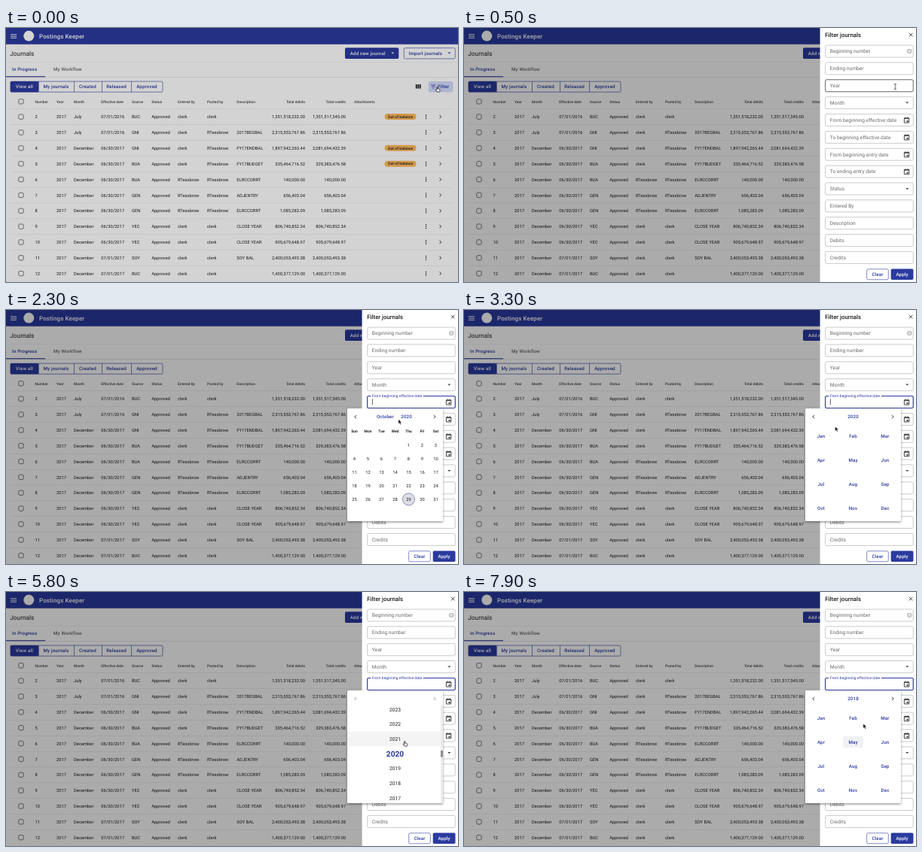
Write an HTML page that moves like this. It is 600x338 px and loops after 8000 ms.

```html
<!DOCTYPE html>
<html lang="en">
<head>
<meta charset="utf-8">
<title>Filter journals</title>
<style>
html, body { margin: 0; width: 100%; height: 100%; overflow: hidden; background: #fff; }
svg { display: block; width: 100vw; height: 100vh; }
text { font: 5.8px Roboto, sans-serif; fill: #1c1c1c; text-rendering: geometricPrecision; white-space: pre; }
.title { font-size: 8px; font-weight: 500; fill: #fff; letter-spacing: .1px; }
.heading { font-size: 8.3px; }
.label { font-size: 6.2px; font-weight: 500; letter-spacing: .15px; }
.blue { fill: #2a3a9f; }
.white { fill: #fff; }
.grey { fill: #666; }
.column { font-size: 4.8px; font-weight: 500; fill: #444; }
.badge { font-size: 5.1px; font-weight: 500; }
.panel-title { font-size: 7.8px; font-weight: 500; }
.field { font-size: 6.7px; fill: #6b6b6b; }
.float { font-size: 5px; fill: #2a3a9f; }
.weekday { font-size: 4.9px; font-weight: 700; }
.year { font-size: 6.7px; }
.chosen { font-size: 10.2px; font-weight: 700; fill: #2a3a9f; }
.mid { text-anchor: middle; }
.end { text-anchor: end; }
.line { fill: none; stroke: #333; stroke-width: .9; }
.popup { transform-origin: 516px 131px; }
</style>
</head>
<body>
<svg id="stage" viewBox="0 0 600 338"></svg>
<script>
const LOOP = 8000;
const BLUE = '#2a3a9f';
const USER = 'clerk', STAFF = 'RTessbrow';

const text = (x, y, str, cls = '') => `<text x="${x}" y="${y}" class="${cls}">${str}</text>`;
const rect = (x, y, w, h, fill, extra = '') =>
  `<rect x="${x}" y="${y}" width="${w}" height="${h}" fill="${fill}" ${extra}/>`;
const path = (d, extra = 'class="line"') => `<path d="${d}" ${extra}/>`;
const group = (id, body, extra = '') => `<g id="${id}" ${extra}>${body}</g>`;
const range = (n, fn) => Array.from({ length: n }, (_, i) => fn(i)).join('');
const outline = (x, y, w, h, color, width = .6) =>
  rect(x, y, w, h, 'none', `rx="1.8" stroke="${color}" stroke-width="${width}"`);
const triangle = (x, y, fill) => path(`M${x - 2} ${y - 1}h4l-2 2z`, `fill="${fill}"`);
const chevron = (x, y, dir, color = '#222') =>
  path(`M${x - dir} ${y - 2.2}l${2.2 * dir} 2.2l${-2.2 * dir} 2.2`, `fill="none" stroke="${color}" stroke-width=".9"`);

// Page behind the drawer
function pageHead() {
  const tabs = [['View all', 6, 37], ['My journals', 43, 47], ['Created', 90, 37], ['Released', 127, 39], ['Approved', 166, 42]];
  return rect(0, 0, 600, 338, '#fff') + rect(0, 0, 600, 21.7, BLUE) +
    path('M6 8.7h8M6 11h8M6 13.3h8', 'stroke="#fff" stroke-width=".9"') +
    '<circle cx="30.3" cy="10.6" r="7" fill="#fff"/>' +
    text(44, 13.5, 'Postings Keeper', 'title') +
    text(5.3, 36.6, 'Journals', 'heading') +
    rect(450, 26.3, 71.3, 14.8, BLUE, 'rx="1.8"') + text(456.8, 35.9, 'Add new journal', 'label white') +
    triangle(513.3, 33.5, '#fff') +
    outline(528.3, 26.6, 68, 14.3, BLUE) + text(534.5, 35.9, 'Import journals', 'label blue') + triangle(588.5, 33.5, BLUE) +
    rect(0, 45.4, 600, .4, '#e4e4e4') +
    text(8, 57.2, 'In Progress', 'label blue') + text(63, 57.2, 'My Workflow', 'label grey') +
    rect(0, 65, 600, .5, '#d5d5d5') + rect(0, 64.2, 52, 1.1, BLUE) +
    rect(6, 71, 37, 14.3, BLUE, 'rx="1.5"') + outline(5.8, 71.1, 202.2, 14.1, BLUE) +
    tabs.map(([name, x, w], i) => rect(x, 71.1, .6, 14, BLUE) +
      text(x + w / 2, 80.4, name, 'label mid ' + (i ? 'blue' : 'white'))).join('') +
    range(3, i => rect(543.8 + i * 2.5, 75, 2, 5.6, '#333')) +
    rect(560.7, 71, 32.6, 14.4, '#d3d9fb', 'rx="1.8"') +
    path('M564 76h6.4M565.2 78.1h4M566.4 80.2h1.6', `stroke="${BLUE}" stroke-width=".8"`) +
    text(573.2, 80.4, 'Filter', 'label blue');
}

function table() {
  const stops = [38.5, 67, 90, 126.3, 167, 193.3, 228, 267, 306.3, 397, 451, 462];
  const align = i => i === 9 || i === 10 ? ' end' : '';
  const names = 'Number|Year|Month|Effective date|Source|Status|Entered by|Posted by|Description|Total debits|Total credits|Attachments';
  const rows = [
    ['BUC', USER, USER, '', '1,351,518,232.00', '1,351,517,345.00', 'out'],
    ['GNI', USER, STAFF, '2017BEGBAL', '2,315,553,767.86'],
    ['GNI', USER, STAFF, 'FY17ENDBAL', '1,897,942,265.44', '2,081,694,432.39', 'out'],
    ['BUA', USER, STAFF, 'FY17BUDGET', '335,464,716.52', '329,383,476.58', 'out'],
    ['BUA', STAFF, STAFF, 'ELRCCORRT', '140,000.00'],
    ['GEN', STAFF, STAFF, 'ADJENTRY', '656,403.04'],
    ['GEN', STAFF, STAFF, 'ELRCCORRT', '1,085,283.09'],
    ['YEC', USER, USER, 'CLOSE YEAR', '806,740,852.34'],
    ['YEC', USER, USER, 'CLOSE YEAR', '905,679,648.97'],
    ['SOY', USER, USER, 'SOY BAL', '2,400,053,493.38'],
    ['BUC', USER, USER, '', '1,400,377,129.00']
  ];
  const checkbox = y => outline(16.8, y - 3.2, 6.4, 6.4, '#555', .8);
  return checkbox(97.8) + names.split('|').map((n, i) => text(stops[i], 99.5, n, 'column' + align(i))).join('') +
    rows.map(([source, entered, posted, note, debit, credit = debit, out], i) => {
      const y = 118.1 + i * 20.86;
      const month = i < 2 ? 'July' : 'December';
      const date = i < 2 ? '07/01/2016' : i < 9 ? '06/30/2017' : '07/01/2017';
      const cells = [i + 2, 2017, month, date, source, 'Approved', entered, posted, note, debit, credit];
      return rect(5, y - 10.5, 589, .45, '#dcdcdc') + checkbox(y) +
        cells.map((c, k) => text(stops[k], y + 2.1, c, align(k))).join('') +
        (out ? rect(502.6, y - 4, 42, 8, '#ffb85c', 'rx="4"') + text(523.6, y + 1.8, 'Out of balance', 'badge mid') : '') +
        range(3, k => `<circle cx="557.5" cy="${y - 2.3 + k * 2.3}" r=".75" fill="#222"/>`) + chevron(576.5, y, 1);
    }).join('');
}

// Filter drawer
const fieldTop = i => 23 + i * 22.87;
const box = (i, color, width) => outline(479.6, fieldTop(i), 116.7, 16, color, width);

function calendarIcon(y) {
  return path(`M584.4 ${y - 2.6}h6.4v6.2h-6.4zM584.4 ${y - 1.9}h6.4M586 ${y - 4}v1.5M589.2 ${y - 4}v1.5`) +
    rect(587.6, y + .6, 2, 2, '#333');
}

function drawer() {
  const fields = ['Beginning number', 'Ending number', 'Year', 'Month', 'From beginning effective date', 'To beginning effective date',
    'From beginning entry date', 'To ending entry date', 'Status', 'Entered By', 'Description', 'Debits', 'Credits'];
  const body = fields.map((name, i) => {
    const y = fieldTop(i) + 8;
    const label = text(485.8, y + 2.3, name, 'field');
    return (i === 4 ? group('restLabel', label) : label) + box(i, '#a8a8a8') +
      (i === 3 || i === 8 ? triangle(588.3, y, '#333') : '') + (i > 3 && i < 8 ? calendarIcon(y) : '');
  }).join('');
  const top = fieldTop(4);
  const focus = box(4, BLUE, 1.1) + rect(484.3, top - 1, 69.5, 2, '#fff') +
    text(486, top + 1.2, 'From beginning effective date', 'float') +
    group('caret', rect(485.9, top + 3.8, .7, 8, '#222'));
  return rect(472.6, 0, 128, 338, '#fff') + text(479.3, 11.8, 'Filter journals', 'panel-title') +
    path('M590.9 6.7l4.6 4.6M595.5 6.7l-4.6 4.6') + body +
    outline(588.5, 28.6, 5.6, 4.6, '#777', .7) + path('M589.8 30.2h1.2M589.8 31.6h1.2M592 30.2h1M592 31.6h1', 'stroke="#777" stroke-width=".6"') +
    group('hoverYear', box(2, '#333')) + group('hoverMonth', box(3, '#333')) + group('hoverDate', box(4, '#333')) +
    group('focus', focus) +
    outline(534.7, 320.8, 28.6, 14, BLUE) + text(549, 330, 'Clear', 'label blue mid') +
    rect(566.7, 320.5, 29.8, 14.6, BLUE, 'rx="1.8"') + text(581.6, 330, 'Apply', 'label white mid');
}

// Date picker views
const arrows = color => chevron(464, 142, -1, color) + chevron(569, 142, 1, color);

function daysView(id, month, first, count, active) {
  const at = d => [462.5 + (d + first - 1) % 7 * 18, 179.5 + Math.floor((d + first - 1) / 7) * 18.1];
  const [cx, cy] = at(active);
  const body = ['Sun', 'Mon', 'Tue', 'Wed', 'Thu', 'Fri', 'Sat'].map((d, i) => text(462.5 + i * 18, 163, d, 'weekday mid')).join('') +
    `<circle cx="${cx}" cy="${cy}" r="8.1" fill="#dcdde6" stroke="${active === 29 ? '#4a558f' : 'none'}" stroke-width=".6"/>` +
    range(count, i => { const [x, y] = at(i + 1); return text(x, y + 2.1, i + 1, 'mid'); });
  return group(id, arrows('#222') + text(503.4, 144.1, month, 'label blue mid') + text(531.6, 144.1, '2020', 'label blue mid') +
    group(id + 'Body', body));
}

const monthX = i => 474 + i % 3 * 42.5;
const monthY = i => 167.8 + Math.floor(i / 3) * 31.9;
const monthHover = (id, i) => group(id, rect(monthX(i) - 13.3, monthY(i) - 7.6, 26.6, 15.2, '#f0f1f5', 'rx="1.8"'));

function monthsView(id, year, hovers) {
  const names = 'Jan Feb Mar Apr May Jun Jul Aug Sep Oct Nov Dec'.split(' ');
  return group(id, arrows('#222') + text(516.5, 144.1, year, 'label blue mid') +
    group(id + 'Body', hovers + names.map((m, i) => text(monthX(i), monthY(i) + 2.2, m, 'label blue mid')).join('')));
}

function yearsView() {
  const y = year => 215.2 + (2020 - year) * 19.65;
  const hover = (id, year) => group(id, rect(453, y(year) - 9.8, 124, 19.6, '#f4f4f4'));
  return group('years', arrows('#999') + group('yearsBody', '<g clip-path="url(#list)">' +
    hover('hover2021', 2021) + hover('hover2019', 2019) + hover('hover2018', 2018) +
    range(7, i => {
      const year = 2023 - i, now = year === 2020;
      return text(516.5, y(year) + (now ? 3.6 : 2.4), year, 'mid ' + (now ? 'chosen' : 'year'));
    }) + rect(577, 151, 3, 130, '#ececec') + rect(577, 211, 3, 8.6, '#8c8c8c') + '</g>'));
}

function pointer() {
  return group('pointer',
    group('arrow', path('M0 0v6l1.4-1.3 1 2.2 1.1-.5-1-2.1h1.8z', 'fill="#000" stroke="#fff" stroke-width=".4"')) +
    group('hand', path('M-.6 .6q.6-.9 1.2 0v2.2l2.6.8q.6.3.4 1.2l-.6 2.2h-3.2l-2-2.8q.1-.8 .9-.4l.7.7z',
      'fill="#fff" stroke="#000" stroke-width=".7"')) +
    group('beam', path('M0-3.2v6.4M-1.2-3.4h2.4M-1.2 3.4h2.4', 'stroke="#000" stroke-width=".7"')));
}

document.getElementById('stage').innerHTML =
  '<defs><clipPath id="list"><rect x="453" y="148" width="127" height="133"/></clipPath>' +
  '<filter id="shadow" x="-10%" y="-10%" width="120%" height="125%"><feDropShadow dx="0" dy="1.5" stdDeviation="1.8" flood-opacity=".4"/></filter></defs>' +
  pageHead() + table() + group('scrim', rect(0, 0, 600, 338, '#000')) + group('drawer', drawer()) +
  group('popup', rect(453, 131, 127, 150, '#fff', 'rx="1.5" filter="url(#shadow)"') +
    daysView('october', 'October', 4, 31, 29) +
    monthsView('months2020', 2020, monthHover('hoverJan', 0)) +
    daysView('january', 'January', 3, 31, 30) + yearsView() +
    monthsView('months2018', 2018, monthHover('hoverNov', 10) + monthHover('hoverAug', 7) + monthHover('hoverMay', 4)),
    'class="popup"') + pointer();

// Keyframes written in milliseconds
const sheet = document.head.appendChild(document.createElement('style'));
let rules = '';
function track(id, stops, ease = 'linear') {
  const all = [[0, stops[0][1]], ...stops, [LOOP, stops[stops.length - 1][1]]];
  rules += `@keyframes ${id}{${all.map(([ms, css]) => `${ms / LOOP * 100}%{${css}}`).join('')}}` +
    `#${id}{animation:${id} ${LOOP}ms ${ease} infinite}`;
}
const visible = (id, ...times) => track(id,
  [[0, 'visibility:hidden'], ...times.map((ms, i) => [ms, `visibility:${i % 2 ? 'hidden' : 'visible'}`])], 'step-end');
const fadeIn = (id, from) => track(id, [[from, 'opacity:0'], [from + 300, 'opacity:1']]);

track('scrim', [[0, 'opacity:.17'], [90, 'opacity:.33']]);
track('drawer', [[130, 'transform:translateX(130px)'], [390, 'transform:none']], 'cubic-bezier(0,0,.2,1)');
visible('restLabel', 0, 2020);
visible('focus', 2020, LOOP);
visible('caret', ...Array.from({ length: 12 }, (_, i) => 2080 + i * 500));
visible('hoverYear', 190, 1560);
visible('hoverMonth', 1580, 1680);
visible('hoverDate', 1690, 2020);
track('popup', [[2030, 'opacity:0;transform:scale(.85)'], [2190, 'opacity:1;transform:none']], 'ease-out');

visible('october', 0, 2880);
visible('months2020', 2880, 4320);
fadeIn('months2020Body', 2880);
visible('hoverJan', 3580, 4320);
visible('january', 4320, 4980);
fadeIn('januaryBody', 4320);
visible('years', 4980, 6980);
fadeIn('yearsBody', 4980);
visible('hover2021', 5780, 6400);
visible('hover2019', 6500, 6590);
visible('hover2018', 6590, 6980);
visible('months2018', 6980, LOOP);
fadeIn('months2018Body', 6980);
visible('hoverNov', 6980, 7580);
visible('hoverAug', 7660, 7740);
visible('hoverMay', 7780, LOOP);

track('pointer', [
  [1400, 572.5, 78], [1600, 577, 99], [1800, 587, 122], [2030, 587, 122], [2290, 521, 145.5], [2400, 521, 145.5],
  [2650, 505, 142], [2950, 505, 142], [3600, 482, 166], [4200, 482, 166], [4390, 515.5, 150.3], [4430, 517, 150],
  [4640, 531, 142], [5050, 531, 142], [5480, 522, 210], [5580, 523, 211], [5700, 523, 211], [5790, 529.3, 198.3],
  [6280, 529.3, 198.3], [6680, 525, 257], [7500, 525, 257], [7890, 530, 175.3]
].map(([ms, x, y]) => [ms, `transform:translate(${x}px,${y}px)`]));
visible('beam', 190, 1560, 1690, 1770);
visible('hand', 0, 190, 1560, 1690, 1770, 2120, 2580, 2950, 3580, 4330, 4560, 7560);
visible('arrow', 2120, 2580, 2950, 3580, 4330, 4560, 7560, LOOP);
sheet.textContent = rules;
</script>
</body>
</html>
```
